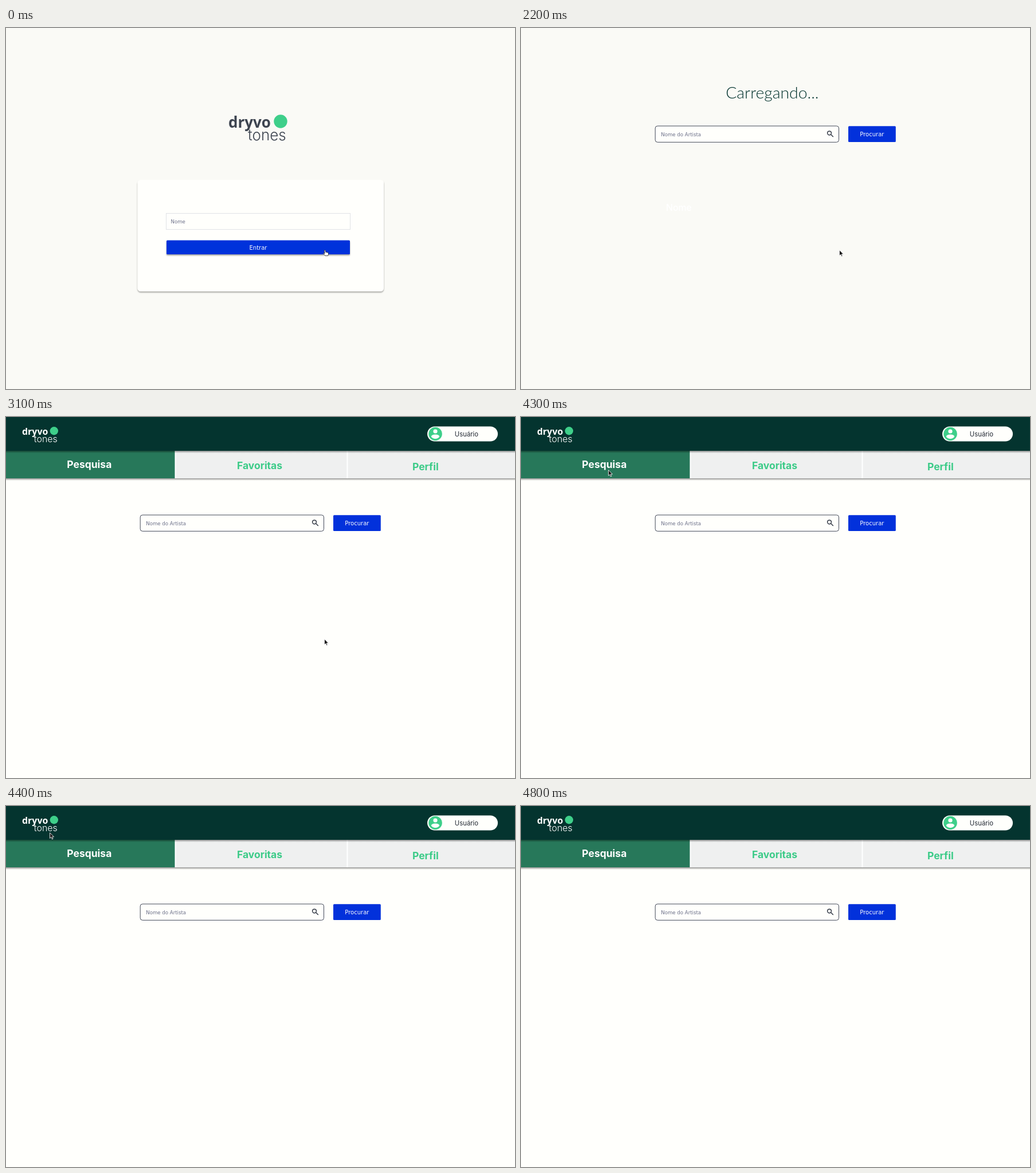
Write an HTML page that moves like this. It is 888 px wide and 630 px high and loops after 5.8 s.

```html
<!DOCTYPE html>
<html lang="pt-BR">
<head>
<meta charset="utf-8">
<title>Música</title>
<style>
  html, body { margin: 0; width: 100%; height: 100%; overflow: hidden; background: #fafaf6; }
  svg { display: block; width: 100%; height: 100%; }

  .ui { font-family: "DejaVu Sans", Verdana, sans-serif; }
  .head { font-family: Inter, sans-serif; }
  .loading { font-family: Lato, sans-serif; font-weight: 300; fill: #04342f; text-anchor: middle; }
  .tab { font: 700 17.5px Inter, sans-serif; fill: #3ccb88; text-anchor: middle; }
  .hint { font-size: 8.6px; fill: #6b6f88; }
  .label { font-size: 10px; fill: #fff; text-anchor: middle; }
  .brand { font: 700 26px "Open Sans", "Noto Sans", sans-serif; }
  .sub { font: 300 26px Inter, sans-serif; }
  .blue { fill: #0231db; }
  .green { fill: #3ecf8a; }
  .paper { fill: #fffffc; }

  /* Hard cuts between screens */
  .login, .wait, .ghost, .find, .home, .pointer {
    opacity: 0;
    animation: 5.8s step-end infinite;
  }
  .login { animation-name: login; }
  .wait { animation-name: wait; }
  .ghost { animation-name: ghost; }
  .find { animation-name: find; }
  .find.load { animation-name: load; }
  .home { animation-name: home; }
  .pointer { animation-name: pointer; }

  @keyframes login { 0% { opacity: 1 } 17.241%, 100% { opacity: 0 } }
  @keyframes wait { 0% { opacity: 0 } 17.241% { opacity: 1 } 37.931%, 100% { opacity: 0 } }
  @keyframes ghost { 0% { opacity: 0 } 17.241% { opacity: 1 } 53.448%, 100% { opacity: 0 } }
  @keyframes load { 0% { opacity: 0 } 37.931% { opacity: 1 } 53.448%, 100% { opacity: 0 } }
  @keyframes find { 0% { opacity: 0 } 37.931%, 100% { opacity: 1 } }
  @keyframes home { 0% { opacity: 0 } 53.448%, 100% { opacity: 1 } }
  @keyframes pointer {
    0% { opacity: 0; transform: translate(555px, 387px) }
    17.241% { opacity: 1; transform: translate(555px, 387px) }
    70.689% { opacity: 1; transform: translate(414px, 260px) }
    72.413% { opacity: 1; transform: translate(268px, 162px) }
    74.137% { opacity: 1; transform: translate(152px, 92px) }
    75.862% { opacity: 1; transform: translate(76px, 46px) }
    77.586% { opacity: 1; transform: translate(49px, 20px) }
    79.31% { opacity: 1; transform: translate(39px, 8px) }
    82.758%, 100% { opacity: 0; transform: translate(39px, 8px) }
  }
</style>
</head>
<body>
<svg viewBox="0 0 888 630" preserveAspectRatio="none">
  <defs>
    <filter id="soft" x="-10%" y="-20%" width="120%" height="150%">
      <feDropShadow dx="0" dy="2" stdDeviation="1.3" flood-opacity=".36"/>
    </filter>
    <linearGradient id="shade" x2="0" y2="1">
      <stop offset="0" stop-opacity=".42"/>
      <stop offset="1" stop-opacity="0"/>
    </linearGradient>
    <g id="logo">
      <text class="brand" x="388" y="174">dryvo</text>
      <text class="sub" x="422" y="195.5">tones</text>
      <circle class="green" cx="479" cy="163" r="11.7"/>
    </g>
  </defs>

  <rect width="888" height="630" fill="#fafaf6"/>

  <g class="login ui">
    <use href="#logo" fill="#3d4450"/>
    <rect class="paper" x="229.5" y="265" width="429.5" height="194.5" rx="5.5" filter="url(#soft)"/>
    <rect class="paper" x="279.5" y="323.5" width="321" height="28" stroke="#e1e2e6"/>
    <text class="hint" x="287.5" y="341">Nome</text>
    <rect class="blue" x="280" y="370.5" width="320" height="24.5" rx="1.5" filter="url(#soft)"/>
    <text class="label" x="440" y="386.7">Entrar</text>
    <path transform="translate(553 387)" fill="#fff" stroke="#222" stroke-width=".8" stroke-linejoin="round"
      d="M2.3 1.1Q3.2 0 4.1 1.1L4.9 4.4Q5.9 3.8 6.5 4.6Q7.4 4.1 8 5Q9.3 4.7 9.5 6Q9.7 8.2 8.7 10.4H3.9Q2.6 8.4 .6 6.7Q.7 5.4 2 6L3.1 6.8Z"/>
  </g>

  <g class="wait">
    <text class="loading" x="440" y="335" font-size="42.5">Carregando...</text>
  </g>
  <g class="ghost head">
    <text x="253" y="319" font-size="15.8" font-weight="500" fill="#fff">Nome</text>
  </g>
  <g class="find load">
    <text class="loading" x="438.3" y="122.5" font-size="28.4">Carregando...</text>
  </g>

  <g class="home head">
    <rect class="paper" width="888" height="630"/>
    <rect y="107" width="888" height="4" fill="url(#shade)"/>
    <rect y="59" width="888" height="48" fill="#eff0f0"/>
    <rect y="59" width="295" height="48" fill="#27785a"/>
    <path d="M295.5 59v48M595.5 59v48" stroke="#fff" stroke-width="2"/>
    <rect y="59" width="888" height="4" fill="url(#shade)"/>
    <rect width="888" height="59" fill="#04342f"/>
    <use href="#logo" fill="#fff" transform="translate(-209.8 -75.7) scale(.613)"/>
    <text class="tab" x="145.3" y="88.5" style="fill:#fff">Pesquisa</text>
    <text class="tab" x="442.5" y="91">Favoritas</text>
    <text class="tab" x="731.8" y="93.3">Perfil</text>

    <rect class="paper" x="735" y="16.5" width="123" height="26" rx="13"/>
    <circle class="green" cx="749" cy="29.5" r="11.8"/>
    <g fill="#fff">
      <circle cx="749" cy="25" r="3.6"/>
      <path d="M741.8 34.2Q742.5 30.8 749 30.6Q755.5 30.8 756.2 34.2Q753.5 38 749 38T741.8 34.2Z"/>
    </g>
    <text x="803.5" y="33.5" font-size="11.3" text-anchor="middle" fill="#252b36">Usuário</text>
  </g>

  <g class="find ui">
    <rect class="paper" x="234.2" y="171" width="320.3" height="28.3" rx="4" stroke="#434959"/>
    <text class="hint" x="244.3" y="188.5">Nome do Artista</text>
    <g fill="none" stroke="#343a46" stroke-width="1.5">
      <circle cx="538" cy="183.3" r="3.4"/>
      <path d="M540.5 185.8l4.3 4.2"/>
    </g>
    <rect class="blue" x="571" y="171.3" width="82.8" height="27.7" rx="1.5"/>
    <text class="label" x="612.4" y="188.8">Procurar</text>
  </g>

  <g class="pointer">
    <path d="M.5.6V10.4L2.8 8.3L4.4 12L6 11.3L4.5 7.8H7.6Z" fill="#1c1c1c" stroke="#fff" stroke-width=".8" stroke-linejoin="round"/>
  </g>
</svg>
</body>
</html>
```
